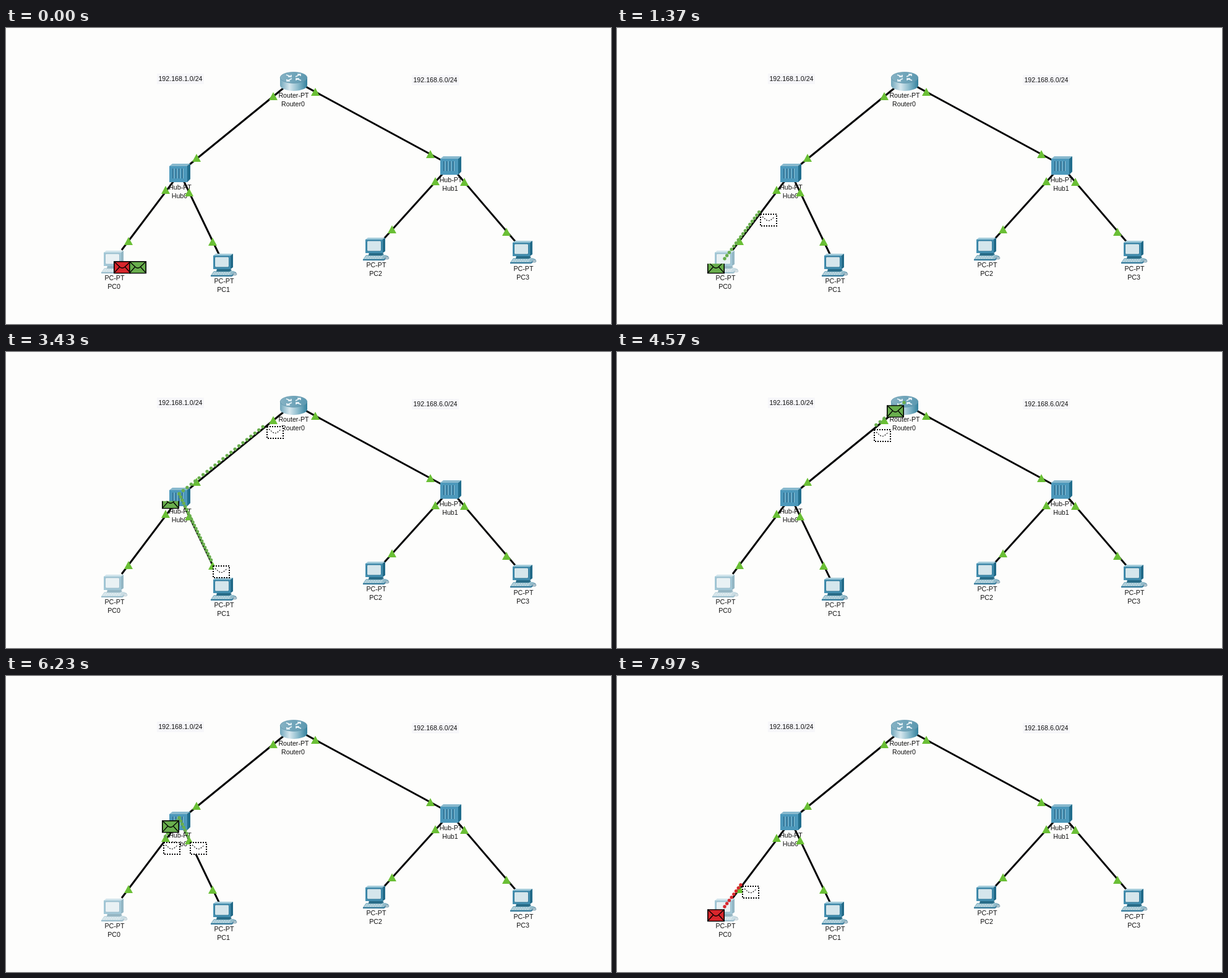
Recreate the animation shown at these times as an HTML page. Size 978 by 480 pixels, loop 8000 ms.

```html
<!DOCTYPE html>
<html lang="en">
<head>
<meta charset="utf-8">
<title>Packet simulation</title>
<style>
  html, body { margin: 0; width: 100%; height: 100%; overflow: hidden; background: #fdfdfc; }
  #stage { display: block; width: 978px; height: 480px; }
  text { font: 10.67px "Liberation Sans", Arial, sans-serif; fill: #111; font-kerning: none; }
  .cable { stroke: #000; stroke-width: 3; }
  .link { fill: #6abf35; }
</style>
</head>
<body>
<svg id="stage" viewBox="0 0 978 480">
  <defs>
    <linearGradient id="metal">
      <stop offset="0" stop-color="#6fa6bb"/><stop offset=".35" stop-color="#d6e7ee"/>
      <stop offset=".65" stop-color="#8dbccd"/><stop offset="1" stop-color="#33809c"/>
    </linearGradient>
    <linearGradient id="lid">
      <stop offset="0" stop-color="#86b2c4"/><stop offset="1" stop-color="#5b98b0"/>
    </linearGradient>
    <g id="pc">
      <path d="M0 36L5 29H37L41 31L33 36Z" fill="#93bccb"/>
      <path d="M0 36H33L41 31V33L34 38H0Z" fill="#33799a"/>
      <path d="M5 32H32M3 34H31" stroke="#dfedf2" stroke-dasharray="3 1"/>
      <path d="M10 25H31L34 28L30 30H9Z" fill="#276b87"/>
      <path d="M4 4L8 1H36L32 4Z" fill="#a3cbda"/>
      <path d="M32 4L36 1V23L32 26Z" fill="#226a88"/>
      <path d="M4 4H32V26H4Z" fill="#438fb0"/>
      <rect x="6.500" y="6" width="23" height="17" rx="2" fill="#d5e6ec" stroke="#2f7797"/>
      <ellipse cx="39" cy="34" rx="3" ry="2" fill="#b7ccd5" stroke="#63869a" stroke-width=".7"/>
    </g>
    <g id="hub">
      <path d="M0 4L5 0H34L29 4Z" fill="#88b9ce"/>
      <path d="M29 4L34 0V25L29 30Z" fill="#226e8d"/>
      <path d="M0 4H29V30H0Z" fill="#4c98bb"/>
      <path d="M6 8V24M11 8V24M16 8V24M21 8V24" stroke="#245f80" stroke-width="1.300"/>
      <path d="M7.500 8V24M12.500 8V24M17.500 8V24M22.500 8V24" stroke="#8fc4da"/>
    </g>
    <g id="router">
      <path d="M0 9V22A22 9 0 0 0 44 22V9Z" fill="url(#metal)"/>
      <ellipse cx="22" cy="9.500" rx="21.700" ry="9" fill="url(#lid)" stroke="#5d93aa" stroke-width=".7"/>
      <path d="M10 5L18 8M18 5V8H13M34 14L26 11M26 14V11H31M25 8L33 4M28 4H33V7M19 11L11 15M11 12V15H16"
        fill="none" stroke="#eef6fa" stroke-width="1.600"/>
    </g>
    <g id="flap" fill="none">
      <path d="M1 1L10 9.500Q14 13 18 9.500L27 1M1 19L9.500 9.500M27 19L18.500 9.500"/>
    </g>
  </defs>
  <g id="network"></g>
  <g id="packets"></g>
</svg>
<script>
const LOOP = 8000, TRAVEL = 1500, ARRIVE = 1350, DOT_STEP = .035, TRAIL_LIFT = 4;
const GREEN = '#69ae4d', RED = '#d8262c';
const byId = id => document.getElementById(id);

// Where a waiting packet's top-left corner sits at each device
const spots = { pc0: [174, 378], pc1: [350, 380], hub: [280, 234], router: [464, 86] };
const hops = [
  { at: 565, from: 'pc0', to: ['hub'] },
  { at: 2278, from: 'hub', to: ['router', 'pc1'] },
  { at: 4172, from: 'router', to: ['hub'] },
  { at: 5870, from: 'hub', to: ['pc0', 'pc1'] },
  { at: 7574, from: 'pc0', to: ['hub'], color: RED }
];

const cables = [[465, 84, 280, 235], [465, 84.5, 718, 222], [281, 235, 187, 360],
  [281, 235, 351, 381], [718, 223, 598, 356], [718, 223, 836, 361]];
const links = [[432, 111], [500, 104], [308, 211], [686, 205], [258, 263], [296, 267],
  [198, 346], [334, 347], [694, 249], [741, 250], [624, 327], [809, 331]];
const devices = [['router', 443, 71], ['hub', 264, 220], ['hub', 702, 208],
  ['pc', 154, 360, .48], ['pc', 331, 365], ['pc', 577, 339], ['pc', 815, 344]];
const names = [['Router', 0, 465, 113], ['Hub', 0, 281.5, 262], ['Hub', 1, 719, 250],
  ['PC', 0, 175.5, 409], ['PC', 1, 352.5, 414], ['PC', 2, 598.5, 388], ['PC', 3, 836.5, 394]];
const subnets = [['192.168.1.0/24', 282, 86], ['192.168.6.0/24', 694, 88]];

const label = (text, x, y) => `<text x="${x}" y="${y}" text-anchor="middle">${text}</text>`;

byId('network').innerHTML = [
  ...cables.map(([a, b, c, d]) => `<line class="cable" x1="${a}" y1="${b}" x2="${c}" y2="${d}"/>`),
  ...devices.map(([kind, x, y, alpha = 1]) => `<use href="#${kind}" x="${x}" y="${y}" opacity="${alpha}"/>`),
  ...subnets.map(([text, x, y]) =>
    `<rect x="${x - 38}" y="${y - 12}" width="76" height="17" fill="#f6f6f9"/>` + label(text, x, y)),
  ...names.map(([kind, n, x, y]) => label(kind + '-PT', x, y) + label(kind + n, x - 1, y + 14)),
  ...links.map(([x, y]) => `<path class="link" d="M${x} ${y - 7}l7 13h-14z"/>`)
].join('');

// The top of a packet is cut away as it drains
function envelope([x, y], color = GREEN, height = 20.5) {
  const cut = 20.5 - height;
  return `<svg x="${x}" y="${y + cut}" width="28" height="${height}" viewBox="0 ${cut} 28 ${height}">
    <rect x=".8" y=".8" width="26.4" height="18.9" fill="${color}" stroke="#000" stroke-width="1.6"/>
    <use href="#flap" stroke="#000" stroke-width="1.3"/></svg>`;
}

function ghost([x, y]) {
  return `<g transform="translate(${Math.round(x)} ${Math.round(y)})" stroke="#000">
    <rect x="1" y="1" width="26" height="19" fill="#fff" stroke-width="2" stroke-dasharray="2 2"/>
    <path d="M4 5L10 10Q14 13 18 10L24 5" fill="none" stroke-width="1.1" stroke-dasharray="2 2"/></g>`;
}

const between = (a, b, f) => a.map((v, i) => v + (b[i] - v) * f);
const shift = ([x, y], dx) => [x + dx, y];
const ramp = (t, start, length) => Math.min(1, Math.max(0, (t - start) / length));

function trail(start, end, f, color) {
  let dots = '';
  for (let g = 0; g < f; g += DOT_STEP) {
    const [x, y] = between(start, end, g);
    dots += `<circle cx="${x}" cy="${y - TRAIL_LIFT}" r="2.7" fill="${color}"/>`;
  }
  return dots;
}

function travelling({ from, to, color = GREEN }, f) {
  const start = spots[from], ends = to.map(name => spots[name]);
  return ends.map(end => trail(start, end, f, color)).join('')
    + envelope(shift(start, -28), color, 20.5 - 15 * Math.max(0, f - .25))
    + ends.map(end => ghost(between(start, end, f))).join('');
}

function arrived(hop, next, t) {
  const slide = ramp(t, next.at - 230, 200);
  return hop.to.map(name => {
    const sender = name === next.from;
    const color = sender && slide ? next.color : GREEN;
    return envelope(shift(spots[name], sender ? -28 * slide : 0), color);
  }).join('');
}

function opening(t) {
  const red = t < 30 ? envelope(spots.pc0, RED) : '';
  return red + envelope(shift(spots.pc0, 25 - 53 * ramp(t, 30, 300)));
}

function scene(t) {
  const index = hops.findLastIndex(hop => t >= hop.at);
  if (index < 0) return opening(t);
  const hop = hops[index], age = t - hop.at;
  return age < ARRIVE ? travelling(hop, age / TRAVEL) : arrived(hop, hops[index + 1], t);
}

const began = performance.now();
function draw() {
  byId('packets').innerHTML = scene((performance.now() - began) % LOOP);
  requestAnimationFrame(draw);
}
draw();
</script>
</body>
</html>
```
